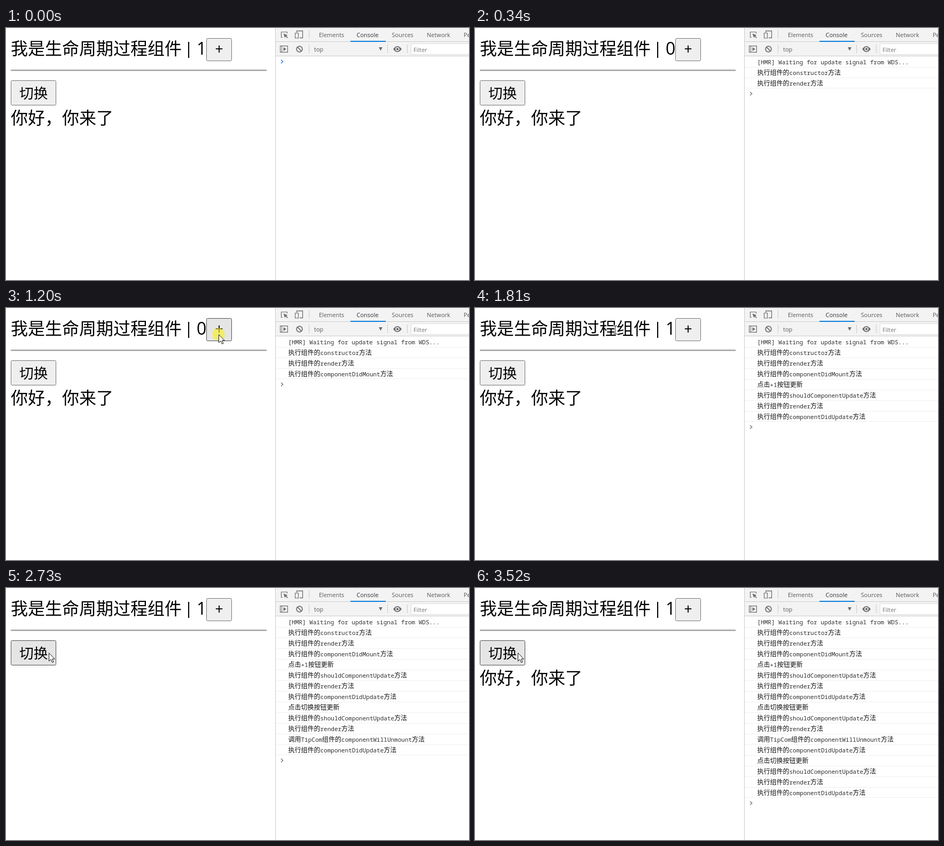
These frames come from a looping animation (867 by 472 pixels, 3900 ms). An HTML page with a canvas:

```html
<!DOCTYPE html>
<html lang="zh-CN">
<head>
<meta charset="utf-8">
<title>组件生命周期</title>
<style>
html, body { margin: 0; width: 100%; height: 100%; overflow: hidden; background: #fff; }
canvas { display: block; }
</style>
</head>
<body>
<canvas id="stage" width="867" height="472"></canvas>
<script>
const ctx = document.getElementById('stage').getContext('2d');
const LOOP = 3900;
const CJK = '"Noto Sans CJK SC", "Noto Sans CJK", sans-serif';
const UI = '"Open Sans", "Noto Sans", sans-serif';
const MONO = '"Noto Sans Mono", "DejaVu Sans Mono", monospace';

const run = name => `执行组件的${name}方法`;
const update = label => [`点击${label}按钮更新`, run('shouldComponentUpdate'), run('render')];
const LOGS = [
  { at: 240, lines: ['[HMR] Waiting for update signal from WDS...'] },
  { at: 340, lines: [run('constructor'), run('render')] },
  { at: 380, lines: [run('componentDidMount')] },
  { at: 1300, lines: [...update('+1'), run('componentDidUpdate')] },
  { at: 2730, lines: [...update('切换'), '调用TipCom组件的componentWillUnmount方法', run('componentDidUpdate')] },
  { at: 3520, lines: [...update('切换'), run('componentDidUpdate')] }
];

// press, release, highlight end
const PRESSES = [[1120, 1200, 1250], [2500, 2650, 2730], [3340, 3420, 3470]];

const within = (t, a, b) => t >= a && t < b;

function text(str, x, y, font, color = '#000') {
  ctx.font = font;
  ctx.fillStyle = color;
  ctx.fillText(str, x, y);
  return ctx.measureText(str).width;
}

function rect(x, y, w, h, color) {
  ctx.fillStyle = color;
  ctx.fillRect(x, y, w, h);
}

function path(points, closed) {
  ctx.beginPath();
  points.forEach(([x, y]) => ctx.lineTo(x, y));
  if (closed) ctx.closePath();
}

function stroke(color, width = 1) {
  ctx.strokeStyle = color;
  ctx.lineWidth = width;
  ctx.stroke();
}

function fill(color) {
  ctx.fillStyle = color;
  ctx.fill();
}

function line(points, color, width) {
  path(points);
  stroke(color, width);
}

function circle(x, y, r) {
  ctx.beginPath();
  ctx.arc(x, y, r, 0, Math.PI * 2);
}

function button(x, y, w, h, hover, active) {
  ctx.beginPath();
  ctx.roundRect(x + 0.5, y + 0.5, w - 1, h - 1, 2);
  fill(active ? '#f5f5f5' : hover ? '#e5e5e5' : '#efefef');
  stroke(active ? '#8d8d8d' : hover ? '#4f4f4f' : '#767676');
}

function page(t) {
  if (within(t, 100, 300)) return;
  const active = PRESSES.some(([a, b]) => within(t, a, b));
  const count = within(t, 300, 1300) ? '0' : '1';

  text('我是生命周期过程组件', 9, 50, '32px ' + CJK);
  text('|', 333.5, 49, '31px ' + UI);
  text(count, 357, 50, '32px ' + UI);

  const overPlus = within(t, 1120, 1680);
  button(375, 19, 48, 43, overPlus, overPlus && active);
  text('+', 391.5, 48.5, '26.67px ' + UI);

  rect(9, 78, 479, 2, '#9a9a9a');
  rect(9, 80, 479, 2, '#eee');

  const overSwitch = t >= 2190;
  button(9, 98, 85, 47, overSwitch, overSwitch && active);
  text('切换', 25, 132, '26.67px ' + CJK);

  if (!within(t, 2730, 3470)) text('你好，你来了', 9, 180, '32px ' + CJK);
}

function inspectIcon() {
  line([[518, 17.5], [515.5, 17.5], [515.5, 7.5], [526.5, 7.5], [526.5, 10]], '#6e6e6e', 1.2);
  path([[519.5, 10.5], [527.5, 13.5], [524.8, 14.8], [528, 18], [526.8, 19], [523.7, 16], [522.2, 18.5]], true);
  fill('#6e6e6e');
}

function deviceIcon() {
  line([[544.5, 8.5], [544.5, 5.5], [555.5, 5.5], [555.5, 18.5], [550, 18.5]], '#6e6e6e', 1.3);
  ctx.beginPath();
  ctx.rect(541.5, 9.5, 6, 9.5);
  stroke('#6e6e6e', 1.2);
}

function sidebarIcon() {
  ctx.beginPath();
  ctx.rect(513.6, 33.6, 13.8, 11.8);
  stroke('#6e6e6e', 1.2);
  line([[516.5, 34], [516.5, 45]], '#6e6e6e');
  path([[519.5, 36], [525, 39.5], [519.5, 43]], true);
  fill('#6e6e6e');
}

function clearIcon() {
  circle(549.5, 39.5, 5.4);
  stroke('#6e6e6e', 1.7);
  line([[545.7, 35.7], [553.3, 43.3]], '#6e6e6e', 1.7);
}

function eyeIcon() {
  ctx.beginPath();
  ctx.moveTo(725, 39.5);
  ctx.quadraticCurveTo(733, 28.5, 741, 39.5);
  ctx.quadraticCurveTo(733, 50.5, 725, 39.5);
  fill('#6e6e6e');
  circle(733, 39.5, 3.7);
  fill('#f3f3f3');
  circle(733, 39.5, 2.2);
  fill('#6e6e6e');
}

function toolbars() {
  rect(504, 0, 1, 472, '#ccc');
  rect(505, 0, 362, 52, '#f3f3f3');
  rect(505, 25, 362, 1, '#ccc');
  rect(505, 52, 362, 1, '#ccc');
  rect(645, 24, 66, 2, '#0f7fe0');

  const tabs = { Elements: 586, Console: 656.5, Sources: 722.5, Network: 788, Performance: 857 };
  for (const name in tabs) {
    text(name, tabs[name], 17, '11px ' + UI, name === 'Console' ? '#333' : '#5a5a5a');
  }
  inspectIcon();
  deviceIcon();
  sidebarIcon();
  clearIcon();
  eyeIcon();
  rect(567, 4, 1, 16, '#ccc');
  [567, 714, 751].forEach(x => rect(x, 31, 1, 16, '#ccc'));

  text('top', 577, 44, '11px ' + UI, '#5a5a5a');
  path([[698, 36], [705, 36], [701.5, 42.5]], true);
  fill('#6e6e6e');

  rect(758, 29, 109, 21, '#ddd');
  rect(759, 30, 108, 19, '#fff');
  text('Filter', 763, 45, '11px ' + UI, '#757575');
}

function logLine(str, y) {
  let x = 528.5;
  for (const part of str.match(/[\x20-\x7e]+|[^\x20-\x7e]+/g)) {
    const latin = part.charCodeAt(0) < 128;
    x += text(part, x, y, latin ? '11px ' + MONO : '12px ' + CJK, latin ? '#303030' : '#111');
  }
}

function consolePane(t) {
  const lines = LOGS.filter(g => t >= g.at).flatMap(g => g.lines);
  lines.forEach((str, i) => {
    if (i) rect(505, 53 + 20 * i, 362, 1, '#f0f0f0');
    logLine(str, 68 + 20 * i);
  });
  const n = lines.length;
  if (n) rect(505, 52 + 20 * n, 362, 1, '#f0f0f0');
  const y = 63 + 20 * n;
  line([[515, y - 3.3], [518.5, y], [515, y + 3.3]], t < 100 ? '#367cf1' : '#727888', 1.5);
}

// Number of the n evenly spread 10 ms ticks from a to b that have passed.
function ticks(t, a, b, n) {
  let i = 0;
  while (i < n && t >= a + Math.floor((b - a) * i / (n - 1) / 10) * 10) i++;
  return i;
}

function cursorAt(t) {
  if (t < 740) return null;
  if (t < 1680) {
    const s = (ticks(t, 740, 970, 6) - 1) / 5;
    return [357 + 41 * s, 2 + 47 * s];
  }
  if (t < 2220) {
    const s = ticks(t, 1680, 2190, 12) / 12;
    return [398 - 306 * (1 - (1 - s) ** 1.45), 49 - 65.5 * s + 124.5 * s * s];
  }
  const s = ticks(t, 2220, 2320, 3) / 3;
  return [92 - 12 * s, 108 + 13 * s];
}

function arrow() {
  path([[0.5, 0.8], [0.5, 16], [4, 12.8], [6.6, 18.4], [9, 17.4], [6.5, 12], [11.3, 12]], true);
  fill('#fff');
  stroke('#111');
}

function beam() {
  const parts = [[[-3, -7.5], [4, -7.5]], [[0.5, -7.5], [0.5, 7.5]], [[-3, 7.5], [4, 7.5]]];
  parts.forEach(p => line(p, '#fff', 3));
  parts.forEach(p => line(p, '#222', 1));
}

function pointer(t) {
  const pos = cursorAt(t);
  if (!pos) return;
  const [x, y] = pos.map(Math.round);
  if (PRESSES.some(([a, , c]) => within(t, a, c))) {
    circle(x + 0.5, y + 0.5, 11.8);
    fill('rgba(248, 240, 30, 0.62)');
  }
  ctx.save();
  ctx.translate(x, y);
  if (x < 375 && y > 19 && y < 62) beam();
  else arrow();
  ctx.restore();
}

function draw(now) {
  const t = now % LOOP;
  rect(0, 0, 867, 472, '#fff');
  page(t);
  toolbars();
  consolePane(t);
  pointer(t);
}

const start = performance.now();
function tick() {
  draw(performance.now() - start);
  requestAnimationFrame(tick);
}
tick();
</script>
</body>
</html>
```
